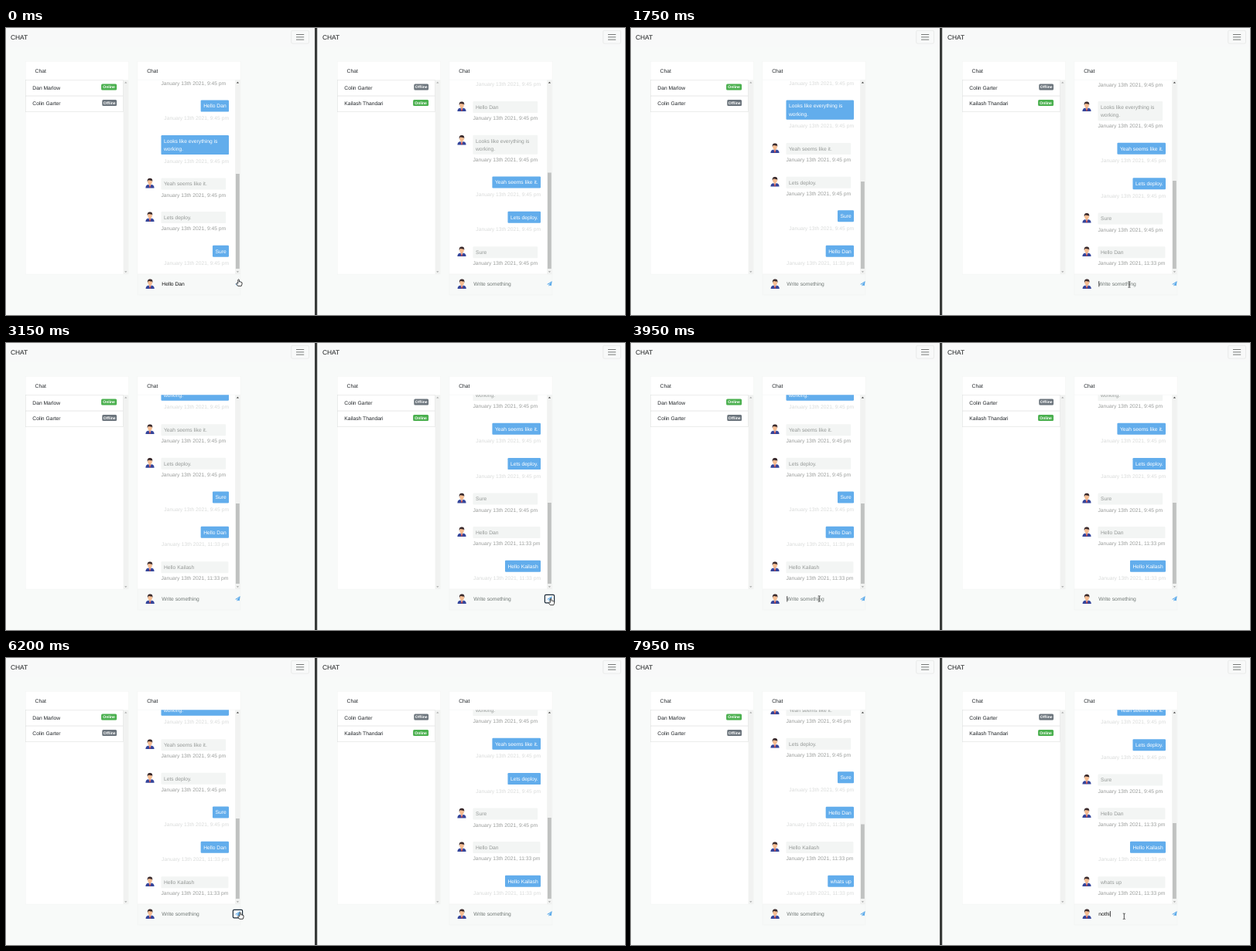
Recreate the animation shown at these times as an HTML page. Size 800 by 372 pixels, loop 8000 ms.

```html
<!DOCTYPE html>
<html lang="en">
<head>
<meta charset="utf-8">
<title>Chat</title>
<style>
  html, body { margin: 0; width: 100%; height: 100%; overflow: hidden; background: #f8faf9; }
  svg { display: block; width: 800px; height: 372px; }
  text { font-family: "Liberation Sans", Arial, sans-serif; font-size: 6.72px; white-space: pre; text-rendering: geometricPrecision; }
</style>
</head>
<body>
<svg id="stage" viewBox="0 0 800 372" xmlns="http://www.w3.org/2000/svg">
  <defs>
    <clipPath id="view"><rect x="170" y="67.3" width="126" height="251.7"/></clipPath>
    <g id="avatar">
      <path d="M-5.6 6.3C-5.6 3.2-4 2.3-1.6 1.7H1.6C4 2.3 5.6 3.2 5.6 6.3Z" fill="#34459b"/>
      <path d="M-1.9 1.5L0 5.2 1.9 1.5Z" fill="#fff"/>
      <path d="M-.6 2.4H.6L.8 5 0 6.2-.8 5Z" fill="#d0453f"/>
      <path d="M-1.2 0H1.2V2L0 3-1.2 2Z" fill="#e3a277"/>
      <ellipse cy="-1.7" rx="2.8" ry="3.3" fill="#f6bd92"/>
      <path d="M-3.1-1.6C-3.8-5-2-6.4.2-6.3 2.9-6.3 3.7-4.4 3.1-1.6L2.4-3.3C.9-3.1-.8-3.3-1.7-4L-2.5-3Z" fill="#3a2a2c"/>
    </g>
    <path id="plane" d="M0 4.3L6.7 0 5.7 6.2 3.6 5.4 2.5 6.8V4.9L5.5 1.4 1.8 4.6Z" fill="#5aa9ea"/>
  </defs>
</svg>
<script>
const LOOP = 8000, STEP = 50, SHIFT = 403, LINE = 10.1;
const NS = "http://www.w3.org/2000/svg";
const stage = document.getElementById("stage");

function add(parent, tag, attrs) {
  const node = document.createElementNS(NS, tag);
  for (const key in attrs) node.setAttribute(key, attrs[key]);
  return parent.appendChild(node);
}
const rect = (p, x, y, width, height, fill, more) => add(p, "rect", { x, y, width, height, fill, ...more });
const path = (p, d, fill, more) => add(p, "path", { d, fill, ...more });
function label(p, x, y, str, fill, more) {
  const node = add(p, "text", { x, y, fill, ...more });
  node.textContent = str;
  return node;
}
const show = (node, on) => node.setAttribute("display", on ? "inline" : "none");
const place = (node, x, y) => node.setAttribute("transform", `translate(${x.toFixed(2)} ${y.toFixed(2)})`);

// "a" writes in the left window, "b" in the right one
const OLD = "January 13th 2021, 9:45 pm", NEW = "January 13th 2021, 11:33 pm";
const TALK = [
  ["b", ["Hi"], OLD],
  ["a", ["Hello Dan"], OLD],
  ["a", ["Looks like everything is", "working."], OLD],
  ["b", ["Yeah seems like it."], OLD],
  ["b", ["Lets deploy."], OLD],
  ["a", ["Sure"], OLD],
  ["a", ["Hello Dan"], NEW],
  ["b", ["Hello Kailash"], NEW],
  ["a", ["whats up"], NEW]
];

function message(parent, [who, lines, date], owner) {
  const sent = who === owner, extra = (lines.length - 1) * LINE;
  const g = add(parent, "g");
  const box = rect(g, 200.5, -7.4, 0, 15 + extra, sent ? "#62adec" : "#f3f5f4", { rx: 1.2 });
  const rows = lines.map((s, i) => label(g, 204, 2.4 + i * LINE, s, sent ? "#fff" : "#959997"));
  const dateGap = (sent ? 15.9 : 14.4) + extra;
  const stamp = label(g, sent ? 288 : 200.5, dateGap + 2.4, date, sent ? "#d9dbda" : "#9a9d9b",
    { "text-anchor": sent ? "end" : "start" });
  let width = stamp.getComputedTextLength();
  if (sent) {
    width = extra ? 87.5 : rows[0].getComputedTextLength() + 6.8;
    box.setAttribute("x", 288 - width);
    rows.forEach(r => r.setAttribute("x", 288 - width + 3.5));
  } else {
    add(g, "use", { href: "#avatar", x: 186, y: -0.8 });
  }
  box.setAttribute("width", width);
  return { g, dateGap, pitch: (sent ? 45.4 : 43.6) + extra };
}

function scrollbar(p, x, up) {
  rect(p, x, 67.3, 6.6, 251.7, "#f1f2f1");
  const c = x + 3.2;
  path(p, `M${c - 1.6} 71.6h3.2l-1.6-1.9z`, up);
  path(p, `M${c - 1.6} 315.2h3.2l-1.6 1.9z`, "#a3a5a4");
}

function card(p, x) {
  rect(p, x, 43.3, 133, 275.7, "#fff", { stroke: "#000", "stroke-opacity": .03, "stroke-width": .6 });
  label(p, x + 12.2, 57.6, "Chat", "#212529");
}

function windowPane(dx, owner, contacts, thumbTops) {
  const p = add(stage, "g", { transform: `translate(${dx} 0)` });
  rect(p, 0, 0, 399, 24, "#f8f9f9");
  label(p, 6, 14.9, "CHAT", "#1c1e1f", { style: "font-size:8.4px" });
  rect(p, 368.7, 3.3, 22.8, 16.8, "none", { rx: 1.7, stroke: "#dfe1e0", "stroke-width": .6 });
  path(p, "M375 8.5h10.2M375 11.8h10.2M375 15.1h10.2", "none", { stroke: "#777978", "stroke-width": 1 });

  card(p, 25.4);
  scrollbar(p, 151.6, "#a3a5a4");
  contacts.forEach(([name, online], i) => {
    const y = 67.5 + i * 20.6;
    rect(p, 25.6, y, 126, 20.6, "#fff", { stroke: "#dfe1e0", "stroke-width": .6 });
    label(p, 34.3, y + 12.2, name, "#212529");
    const w = online ? 20 : 18.8;
    rect(p, 143.1 - w, y + 5, w, 7.9, online ? "#4bb04f" : "#6c757d", { rx: 1.5 });
    label(p, 143.1 - w / 2, y + 10.7, online ? "Online" : "Offline", "#fff",
      { "text-anchor": "middle", style: "font-size:5.04px;font-weight:bold" });
  });

  card(p, 170);
  path(p, "M170 67.2h133", "none", { stroke: "#f1f3f2", "stroke-width": .5 });
  const list = add(p, "g", { "clip-path": "url(#view)" });
  const items = TALK.map(m => message(list, m, owner));
  scrollbar(p, 296.2, "#333");
  const thumb = rect(p, 297, 0, 4.8, 0, "#c0c2c1");

  rect(p, 170, 319, 133, 27, "#f7f9f8", { stroke: "#000", "stroke-opacity": .035, "stroke-width": .5 });
  add(p, "use", { href: "#avatar", x: 186.2, y: 331.8 });
  const field = label(p, 201.3, 333.9, "", "#111");
  const caret = rect(p, 0, 328, .7, 7.4, "#111");
  const ring = rect(p, 293.4, 326.3, 12.2, 10.6, "#fbfcfc", { rx: 1.4, stroke: "#1b2a38", "stroke-width": 1.2 });
  add(p, "use", { href: "#plane", x: 296, y: 328 });

  return ({ count, text, focus }) => {
    let y = 305;
    for (let i = items.length - 1; i >= 0; i--) {
      const it = items[i];
      show(it.g, i < count);
      if (i >= count) continue;
      y -= i === count - 1 ? it.dateGap : it.pitch;
      place(it.g, 0, y);
    }
    const top = thumbTops[count - 6];
    thumb.setAttribute("y", top);
    thumb.setAttribute("height", 312 - top);
    field.textContent = text || "Write something";
    field.setAttribute("fill", text ? "#111" : "#717976");
    const end = text ? field.getComputedTextLength() : 2.6;
    caret.setAttribute("x", 201.5 + (text ? end : 0));
    show(caret, focus === "field");
    show(ring, focus === "button");
  };
}

const left = windowPane(0, "a", [["Dan Marlow", true], ["Colin Garter", false]], [189, 199, 208, 215.5]);
const right = windowPane(SHIFT, "b", [["Colin Garter", false], ["Kailash Thandari", true]], [187.5, 198, 207, 214]);
rect(stage, 399, 0, 3.2, 372, "#393b3a");

// Pointer shapes, each with its hot spot at 0,0
const ink = { stroke: "#111", "stroke-width": .8, "stroke-linejoin": "round" };
const pointers = {
  hand: path(stage, "M-.8.6Q0-.5.8.6V3.2L2 3.1 3.2 3.5 4.4 4.1V6.3L3.6 8.6H-.9L-3 5.6Q-3 4.3-.8 5.3Z", "#fff", ink),
  arrow: path(stage, "M0 0V7.2L1.7 5.7 2.8 8.2 3.9 7.7 2.8 5.2H5Z", "#111", { stroke: "#fff", "stroke-width": .5 }),
  beam: path(stage, "M-1.5-3.6H-.5L0-3.2.5-3.6H1.5M-1.5 3.6H-.5L0 3.2.5 3.6H1.5M0-3.2V3.2", "none", { stroke: "#222", "stroke-width": .8 })
};

// start, end, x, y, downward bow
const START = [300.6, 325.8];
const MOVES = [
  [0, 50, 302.3, 326, 0],
  [450, 1000, 648, 338, 32],
  [1050, 1200, 644, 332.5, 0],
  [2750, 2950, 704.2, 331, 3],
  [3250, 3800, 245, 333, 18],
  [3850, 4050, 241.5, 330, 0],
  [5450, 6050, 302.6, 329.7, 0],
  [6350, 6800, 637.3, 334.8, 2]
];

function pointerAt(t) {
  let [x, y] = START;
  for (const [from, to, tx, ty, bow] of MOVES) {
    if (t < from) break;
    const p = Math.min(1, (t - from) / (to - from)), e = p * p * (3 - 2 * p);
    x += (tx - x) * e;
    y += (ty - y) * e + bow * Math.sin(Math.PI * e);
  }
  return [x, y];
}

function pointerKind(x, y) {
  const px = x > 402 ? x - SHIFT : x;
  if (y < 320 || y > 343) return "arrow";
  if (px > 293 && px < 306) return "hand";
  return px > 197 && px <= 293 ? "beam" : "arrow";
}

const typed = (str, t, from, gap) => t < from ? "" : str.slice(0, 1 + Math.floor((t - from) / gap));
const within = (t, a, b) => t >= a && t < b;
const countAt = (t, times) => 6 + times.filter(at => t >= at).length;

function draw(t) {
  left({
    count: countAt(t, [250, 3050, 6250]),
    text: t < 200 ? "Hello Dan" : t < 6150 ? typed("whats up", t, 4350, 110) : "",
    focus: within(t, 200, 1450) || within(t, 6150, 6850) ? "button" : within(t, 3900, 6150) ? "field" : ""
  });
  right({
    count: countAt(t, [300, 3050, 6250]),
    text: t < 3000 ? typed("Hello Kailash", t, 2150, 50) : t < 7600 ? typed("n", t, 7400, 100) : typed("nothi", t, 7500, 100),
    focus: within(t, 3000, 3900) ? "button" : within(t, 1450, 3000) || t >= 6850 ? "field" : ""
  });
  const [x, y] = pointerAt(t), kind = pointerKind(x, y);
  for (const name in pointers) {
    show(pointers[name], name === kind);
    place(pointers[name], x, y);
  }
}

let begin = null;
function tick(now) {
  if (begin === null) begin = now;
  draw(Math.floor((now - begin) % LOOP / STEP) * STEP);
  requestAnimationFrame(tick);
}
draw(0);
requestAnimationFrame(tick);
</script>
</body>
</html>
```
